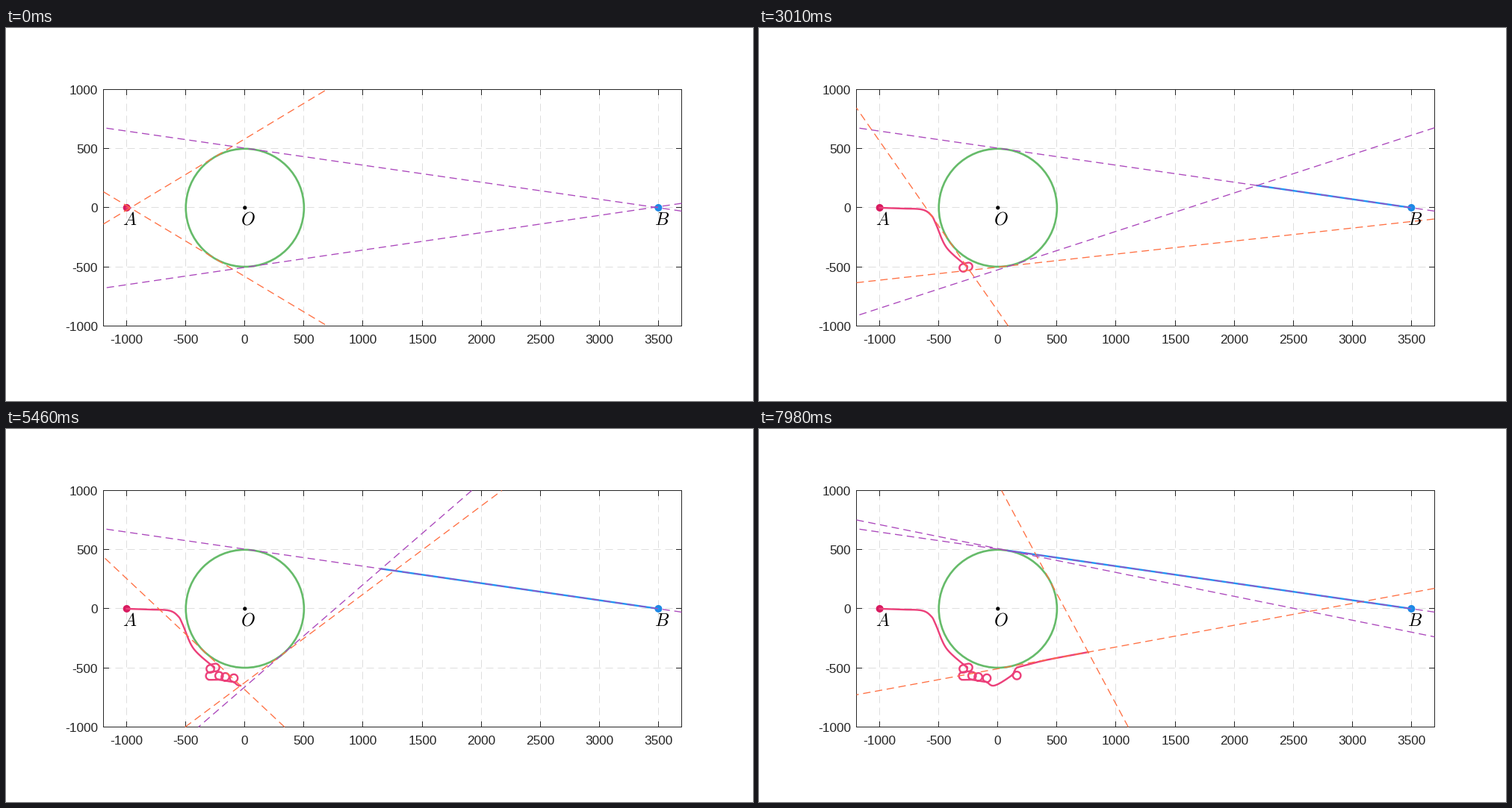
Write a matplotlib script that moves like this. It is 1000x500 px and loops after 8000 ms.

```python
import numpy as np
import matplotlib.pyplot as plt
from matplotlib.animation import FuncAnimation
from matplotlib.collections import LineCollection

W, H = 1000, 500
PT = 0.72                        # points per pixel at 100 dpi
LOOP, TICK, HOLD = 8000, 20, 70  # ms
STEPS = -(-LOOP // HOLD)

SCALE = 775 / 4900               # pixels per data unit
CENTRE = np.array([319.8, 240.95])
RADIUS = 500 * SCALE
LEFT, TOP, RIGHT, BOTTOM = 130.5, 82.5, 904.5, 399.5

INK, GRID = "#262626", "#DEDEDE"
GREEN, ORANGE, PURPLE = "#66BB6A", "#FF7043", "#AB47BC"
PINK, CRIMSON = "#EC407A", "#D81B60"
BLUE, DEEP_BLUE = "#2196F3", "#1E88E5"


def to_px(x, y):
    return CENTRE + np.array([x, -y]) * SCALE


def arc(centre, start, sweep, r0=5.2, r1=None):
    """Points on an arc, or a spiral from r0 to r1; degrees run clockwise."""
    n = int(abs(sweep) // 30) + 2
    a = np.radians(np.linspace(start, start + sweep, n))
    r = np.linspace(r0, r1 or r0, n)
    return np.column_stack([r * np.cos(a), r * np.sin(a)]) + centre


def smooth(points, n=12):
    """Catmull-Rom curve with n samples per span."""
    p = np.vstack([2 * points[0] - points[1], points,
                   2 * points[-1] - points[-2]])
    t = (np.arange(n) / n)[:, None]
    spans = []
    for a, b, c, d in zip(p, p[1:], p[2:], p[3:]):
        spans.append(b + t * (c - a) / 2
                     + t**2 * (2 * a - 5 * b + 4 * c - d) / 2
                     + t**3 * (3 * b - a - 3 * c + d) / 2)
    return np.vstack(spans + [points[-1:]])


START_A, START_B = to_px(-1000, 0), to_px(3500, 0)


def build_route():
    """Approach, slide round the circle, curl through loops, then run off."""
    parts = [START_A, (190, 242), (218, 243.3), (230.5, 251)]
    parts.append(arc(CENTRE, 165.4, -46, 1.085 * RADIUS, 1.116 * RADIUS))
    parts.append(arc((273.5, 321.5), -40, 300))
    parts.append(arc((280.5, 319.7), 250, 200))
    parts.append(arc((272.8, 331), 270, -180))
    for centre in [(285.3, 330.8), (293.6, 332.3), (305, 334)]:
        parts.append(arc(centre, 90, -360))
    parts += [(312, 344), (321, 341.5), (336, 332)]
    parts.append(arc((345.2, 330.4), 225, 320))
    parts += [(344, 321), (352, 318), (385, 309.6), (440.6, 299.1)]
    curve = smooth(np.vstack(parts))
    gaps = np.hypot(*np.diff(curve, axis=0).T)
    return curve, np.concatenate([[0], np.cumsum(gaps)])


ROUTE, LENGTH = build_route()


def trail_a(step):
    s = LENGTH[-1] * step / STEPS
    head = [np.interp(s, LENGTH, ROUTE[:, k]) for k in (0, 1)]
    return np.vstack([ROUTE[LENGTH < s], head])


def trail_b(step):
    slope = np.arcsin(500 / 3500)
    heading = -np.array([np.cos(slope), np.sin(slope)])
    return np.array([START_B, START_B + step * 30 * SCALE * heading])


def clip_to_box(p, d):
    """Part of the endless line p + t*d that lies inside the axes box."""
    lo, hi = -np.inf, np.inf
    for k, (a, b) in enumerate([(LEFT, RIGHT), (TOP, BOTTOM)]):
        if abs(d[k]) > 1e-9:
            t = sorted([(a - p[k]) / d[k], (b - p[k]) / d[k]])
            lo, hi = max(lo, t[0]), min(hi, t[1])
    return np.array([p + lo * d, p + hi * d])


def tangents(p):
    to_centre = CENTRE - p
    base = np.arctan2(to_centre[1], to_centre[0])
    half = np.arcsin(min(1, RADIUS / np.hypot(*to_centre)))
    return [clip_to_box(p, np.array([np.cos(a), np.sin(a)]))
            for a in (base - half, base + half)]


fig = plt.figure(figsize=(W / 100, H / 100), dpi=100, facecolor="white")
ax = fig.add_axes([0, 0, 1, 1])
ax.set_xlim(0, W)
ax.set_ylim(H, 0)
ax.axis("off")


def add_lines(segments, color, width, zorder, dashed=False):
    style = (0, (10 / width, 6 / width)) if dashed else "solid"
    lines = LineCollection(segments, colors=color, linewidths=width * PT,
                           linestyles=[style], zorder=zorder)
    lines.set_snap(False)
    ax.add_collection(lines, autolim=False)
    return lines


def add_dot(p, radius, color):
    ax.add_patch(plt.Circle(p, radius, fc=color, ec="none", zorder=4))


def add_label(x, y, text, ha):
    ax.text(x, y, text, ha=ha, va="baseline", color=INK,
            family="Liberation Sans", size=17.2 * PT)


def draw_axes():
    grid, ticks = [], []
    for value in range(-1000, 3501, 500):
        x = np.floor(to_px(value, 0)[0]) + 0.5
        grid.append([(x, BOTTOM), (x, TOP)])
        ticks += [[(x, BOTTOM), (x, BOTTOM - 7.5)], [(x, TOP), (x, TOP + 7.5)]]
        add_label(x, 423, str(value), "center")
    for value in range(-1000, 1001, 500):
        y = np.floor(to_px(0, value)[1]) + 0.5
        grid.append([(LEFT, y), (RIGHT, y)])
        ticks += [[(LEFT, y), (LEFT + 7.5, y)], [(RIGHT, y), (RIGHT - 7.5, y)]]
        add_label(123, y + 6.5, str(value), "right")
    frame = [(LEFT, TOP), (RIGHT, TOP), (RIGHT, BOTTOM), (LEFT, BOTTOM),
             (LEFT, TOP), (RIGHT, TOP)]
    add_lines(grid, GRID, 1, 1, dashed=True)
    add_lines(ticks + [frame], INK, 1, 2)


draw_axes()
ax.add_patch(plt.Circle(CENTRE, RADIUS, fill=False, ec=GREEN, lw=2.67 * PT,
                        zorder=3))
add_dot(CENTRE, 2.6, "black")
add_dot(START_A, 5, CRIMSON)
add_dot(START_B, 5, DEEP_BLUE)
for x, name in [(165.8, "A"), (323.4, "O"), (877.8, "B")]:
    ax.text(x, 263.5, f"${name}$", ha="center", va="baseline", color="black",
            math_fontfamily="cm", size=24 * PT, zorder=7)

path_a, = ax.plot([], [], color=PINK, lw=2.4 * PT, zorder=5)
path_b, = ax.plot([], [], color=BLUE, lw=2.4 * PT, zorder=5)
rays_a = add_lines([], ORANGE, 1.33, 6, dashed=True)
rays_b = add_lines([], PURPLE, 1.33, 6, dashed=True)


def update(i):
    step = (i * TICK + TICK // 2) // HOLD + 1
    for trail, path, rays in [(trail_a(step), path_a, rays_a),
                              (trail_b(step), path_b, rays_b)]:
        path.set_data(trail[:, 0], trail[:, 1])
        rays.set_segments(tangents(trail[-1]))
    return path_a, path_b, rays_a, rays_b


anim = FuncAnimation(fig, update, frames=LOOP // TICK, interval=TICK,
                     repeat=True, repeat_delay=0)
plt.show()
```
